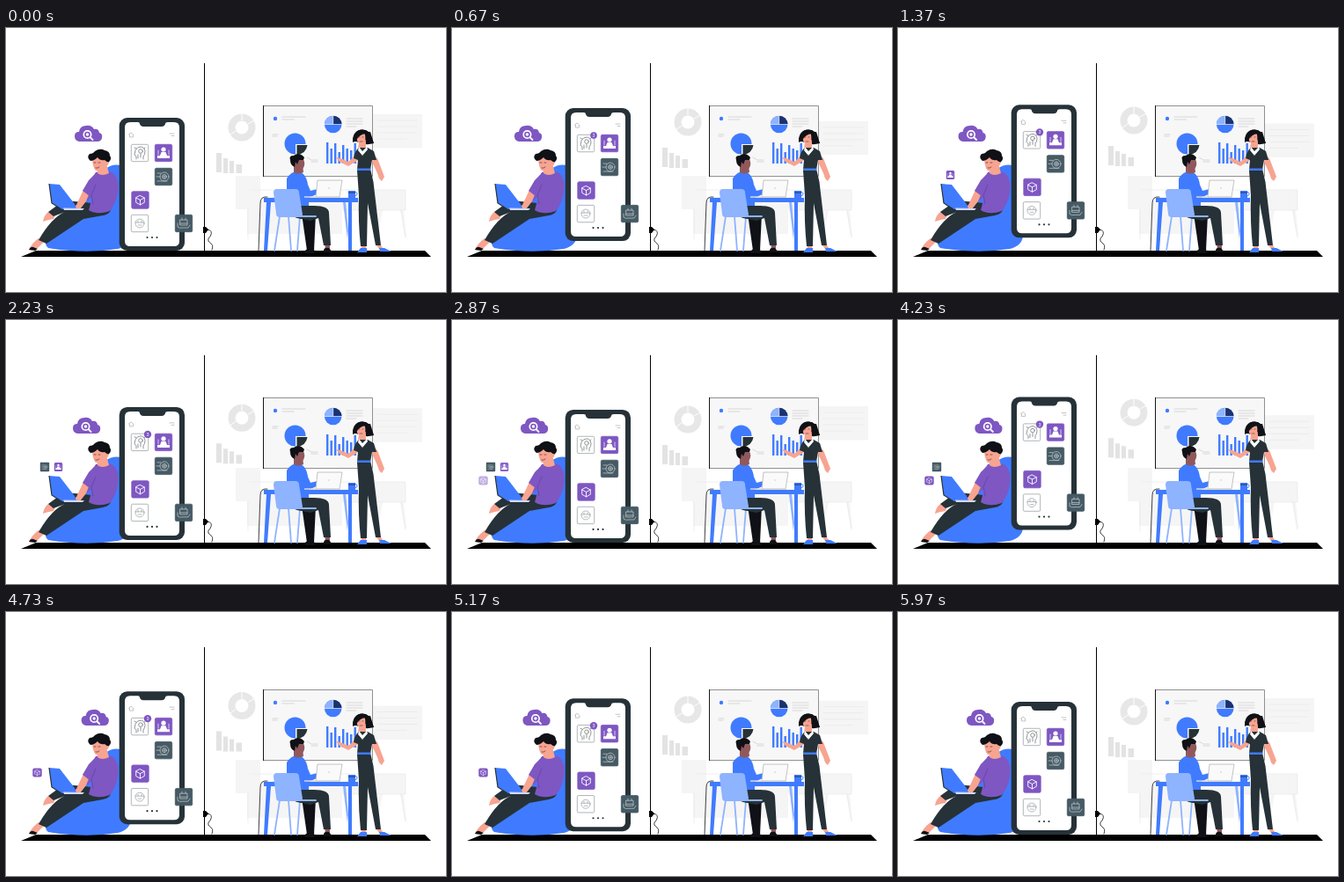
Write an HTML page that moves like this. It is 500 px wide and 300 px high and loops after 6030 ms.

```html
<!DOCTYPE html>
<html lang="en">
<head>
<meta charset="utf-8">
<title>Working together</title>
<style>
html, body { margin: 0; width: 100%; height: 100%; overflow: hidden; background: #fff; }
svg { display: block; width: 500px; height: 300px; }
.line { fill: none; stroke-linecap: round; stroke-linejoin: round; }
.dark { fill: #263238; } .blue { fill: #407bff; } .pale { fill: #8eb3ff; }
.purple { fill: #7e57c2; } .skin { fill: #f7a491; } .brown { fill: #91585c; }
.hair { fill: #101116; } .gray { fill: #e3e3e3; } .white { fill: #fff; }
</style>
</head>
<body>
<svg viewBox="0 0 500 300">
  <defs>
    <g id="cube" class="line" stroke="#fff" stroke-width=".9">
      <path d="M0-5 4.8-2.5V2.8L0 5.4-4.8 2.8V-2.5ZM-4.8-2.5 0 0 4.8-2.5M0 0V5.4"/>
    </g>
    <g id="person">
      <circle class="white" cy="-4" r="2.6"/>
      <path class="white" d="M-2.500-1H2.500L4 3H7V6H-7V3H-4Z"/>
      <path class="line" stroke="#fff" stroke-width=".7" d="M-6 2V-3M6 2V-3"/>
    </g>
    <g id="gear" class="line" stroke="#b8c1c5" stroke-width=".8">
      <circle cx="1" r="5"/><circle cx="1" r="2.500"/>
      <path d="M-7-4H-3M-8 0H-4M-7 5H4M1-2V2M-1 0H3"/>
    </g>
    <g id="mind" class="line" stroke="#85898c" stroke-width=".9">
      <path d="M-4 7V4L-6 2-5-3Q-3-7 1-7T6-2Q6 2 4 4V7"/>
      <circle cx="1" cy="-2" r="2.300"/><path d="M1 1V5M-2 2V6M-6-6-4-5M6-6 5-5"/>
    </g>
    <g id="face" class="line" stroke="#a5aaad" stroke-width=".8">
      <circle r="5"/><path d="M-5-1H5M-2 2H2M-2-3V-1M2-3V-1"/>
    </g>
    <g id="hand" class="line" stroke="#b8c1c5" stroke-width=".8">
      <path d="M-4-4H4V2H-4ZM-2-4V-6M2-4V-6M-7 0V4Q-5 6-1 5H5L7 2M-4 0H4"/>
    </g>
  </defs>

  <!-- background room -->
  <g fill="#f5f5f5">
    <path d="M261 168H289V192H454V207H382V234H274V206H261Z"/>
    <path d="M400 184H454V207H400ZM424 207H428L423 234H420ZM448 207H452L455 237H453Z"/>
  </g>
  <path class="line" stroke="#e9e9e9" stroke-width=".7" d="M277 184H454V207H383M275 206V240M449 207L454 238"/>
  <g id="card">
    <path d="M417 98H473V136.500H417Z" fill="#f5f5f5"/>
    <path class="line" stroke="#e9e9e9" stroke-width=".7" d="M422 105H467M422 112H467M422 119H467M422 126H455"/>
  </g>
  <g id="charts">
    <circle cx="268" cy="113" r="11.500" fill="none" stroke="#e7e7e7" stroke-width="8"/>
    <path d="M268 97V105M282 105L275 109M254 122L261 117" stroke="#fff"/>
    <path class="gray" d="M239 142H245V164H239ZM247 148H252V165H247ZM254 151H259V165H254ZM261.500 155H268V165H261.500Z"/>
  </g>

  <!-- board -->
  <path d="M292 88H417V169H292Z" fill="#f7f7f7"/>
  <path class="line" stroke="#777" stroke-width=".8" d="M293 88.500H416.500V168.500H293"/>
  <path d="M292.500 88V169" stroke="#171717"/>
  <circle class="blue" cx="306" cy="103" r="2.200"/>
  <path class="line" stroke="#c9c9c9" stroke-width=".7" d="M314 101H340M314 104H327M303 121H309M303 123H308M387 103H405M387 106H405M387 109H405M387 112H398M342 147L347 150H354M347 152H354"/>
  <circle class="blue" cx="328.500" cy="131.500" r="12"/>
  <path d="M329 132H343V146H329Z" fill="#f7f7f7"/>
  <path class="dark" d="M330.500 133H342.500Q341 143 330.500 144Z"/>
  <circle class="blue" cx="371.700" cy="109.500" r="9.800"/>
  <path d="M371.700 109.500V99.700A9.800 9.800 0 0 1 381.500 109.500Z" fill="#1b3270"/>
  <path class="pale" d="M371.700 109.500H361.900A9.800 9.800 0 0 1 371.700 99.700Z"/>
  <path d="M371.700 99V109.500H361M371.700 109.500H382" fill="none" stroke="#f7f7f7" stroke-width=".7"/>
  <g id="bars" class="blue"></g>

  <!-- floor, divider and cables -->
  <path d="M34 253H476L483 260H17Z"/>
  <path d="M225.500 40V253" stroke="#000"/>
  <path d="M224 226H227L230 229L227 233H224Z"/>
  <path class="line" stroke="#111" stroke-width=".8" d="M229 229Q236 230 232 237Q227 241 233 245Q236 247 234 252M297 192Q289 191 289 199Q288 225 287 253"/>

  <!-- seated colleague and table -->
  <path class="line" stroke="#8eb3ff" stroke-width="1.800" d="M334 214L331 253"/>
  <path class="hair" d="M336 211H352L350 253H342Z"/>
  <path class="brown" d="M362 244H368V252H363Z"/>
  <path class="dark" d="M318 202H346Q367 201 367 210L369 247H361L355 216L346 219L336 217Q323 216 318 202Z"/>
  <path class="hair" d="M340 253Q342 250 350 251L351 256H340ZM361 252Q362 249 367 250L371 255H361Z"/>
  <path class="blue" d="M293 193H400V198H393V253H389V198H301L297 253H293L296 198H293Z"/>
  <path class="pale" d="M383 198H386L389 230L388 240Z"/>
  <path class="blue" d="M319 171Q324 163 331 163Q341 164 343 178L346 185L354 183L355 188L344 193V202H319Z"/>
  <path class="brown" d="M354 183L358 180L360 182L356 188ZM327 155H337L338 164Q332 167 327 164Z"/>
  <ellipse class="brown" cx="333.500" cy="154" rx="5.800" ry="7.500"/>
  <path class="hair" d="M323 150Q321 145 327 145Q333 140 339 147L338 150H333L331 155L329 152L328 158Q323 156 323 150Z"/>
  <path d="M354 173H382L379 192H352Z" fill="#fafafa" stroke="#aaa" stroke-width=".7"/>
  <path d="M339 192H380" stroke="#d6d6d6" stroke-width="1.500"/>
  <circle cx="367" cy="182" r="1" fill="#ddd"/>
  <path class="blue" d="M389 185H397V193H389Z"/>
  <circle cx="397" cy="188.500" r="2" fill="none" stroke="#407bff"/>
  <path d="M389 187H397" stroke="#1b3270"/>
  <path class="pale" d="M308 183H329Q333 183 333 187L337 212Q337 215 333 215H311Q307 215 307 211L304 187Q304 183 308 183Z"/>
  <path class="line" stroke="#8eb3ff" stroke-width="1.800" d="M311 214L305 253M321 214L324 253M333 214H352"/>

  <!-- presenter -->
  <path class="skin" d="M398 144L402 149L389 157L379 152L375 147L380 148L389 152ZM417 145L422 148L430 169L427 174L424 171L422 165L415 150Z"/>
  <path class="hair" d="M394 129Q394 116 405 115.500Q415 116 415 126L418 131Q408 134 398 129Z"/>
  <path class="skin" d="M402 127H409V137L406 140L400 136Z"/>
  <ellipse class="skin" cx="403.500" cy="124.500" rx="5.200" ry="7"/>
  <path class="hair" d="M394 130Q394 116 405 115.500Q412 116 413 121Q403 118 398 128ZM408 118H414L418 131L409 131Z"/>
  <path class="line" stroke="#55353a" stroke-width=".6" d="M400 124H402M405 124H406M402 129H405"/>
  <path class="dark" d="M401 136H411L418 140L421 150H416L414 161H399L400 150L395 148Q396 140 401 136Z"/>
  <path class="white" d="M401 135L405 140L410 135L411 138L405 145L400 139Z"/>
  <path class="dark" d="M399 162H414.500Q418 174 419 188L426 247H420L411 199L410 248H403Q400 220 401 190Z"/>
  <path class="blue" d="M399 159.500H414.500V162H399Z"/>
  <path class="skin" d="M404 248H409V251H404ZM421 247H426L429 251H424Z"/>
  <path class="blue" d="M403 250H410V255H399ZM424 250H430L438 254H425Z"/>

  <!-- beanbag and reader -->
  <path class="blue" d="M48 250Q43 246 46 238Q59 215 84 205L113 160Q123 153 132 157Q140 182 142 235Q142 247 127 251Q90 257 48 250Z"/>
  <path class="skin" d="M37 239L43 243L36 250Q30 253 26 252Q29 245 37 239ZM48 209L56 212L54 217Q47 218 42 220Q43 213 48 209Z"/>
  <path class="hair" d="M26 252Q28 248 31 249L36 251L33 253Z"/>
  <path class="dark" d="M66 196L89 198L119 202Q121 211 110 213L88 217L46 245L37 241Q52 215 67 209L54 214L48 209Z"/>
  <path class="purple" d="M102 164Q113 160 122 165Q128 171 127.500 181Q127 197 118 208Q104 213 94 207L98 192L91 197L87 191L96 173Z"/>
  <path class="skin" d="M88 184L95 187L91 197L84 206L73 207L80 201Z"/>
  <path class="purple" d="M100 167L104 177L95 191L87 185L94 173Z"/>
  <path d="M102 178L97 190L99 200" fill="none" stroke="#6542a5" stroke-width=".8"/>
  <path class="skin" d="M104 156L114 154L117 165Q109 169 104 165Z"/>
  <path class="skin" d="M98 147Q106 143 114 148L115 156Q109 164 102 162Q98 158 98 147Z"/>
  <path class="hair" d="M96 151Q91 147 95 143Q99 143 101 140Q107 136 112 139Q118 140 118 145Q121 149 116 153L112 150Q107 151 104 147Q100 151 96 151Z"/>
  <circle class="skin" cx="114.500" cy="154" r="2"/>
  <path class="line" stroke="#583238" stroke-width=".7" d="M100 153H102M105 153H107M102 159Q104 160 106 158"/>
  <path class="blue" d="M49 177L61 178L78 200L80 205L63 206L52 199Z"/>
  <path d="M49 177L52 199L63 206" fill="none" stroke="#263238" stroke-width="1.200"/>
  <path d="M65 204.500L89 205L87 207H66Z" fill="#d1dafa"/>

  <g id="small">
    <g transform="translate(59.500 167)"><rect class="purple" x="-4.700" y="-5" width="9.400" height="10" rx="1.500"/><use href="#person" transform="scale(.48)"/></g>
    <g transform="translate(44 167)"><rect x="-5.200" y="-5.300" width="10.400" height="10.600" rx="1" fill="#455a64"/><use href="#gear" transform="scale(.5)"/></g>
    <g transform="translate(35.500 182.500)"><rect class="purple" x="-5.200" y="-5" width="10.400" height="10" rx="2"/><use href="#cube" transform="scale(.58)"/></g>
  </g>

  <g id="phone">
    <rect class="dark" x="128.700" y="102" width="74.300" height="151" rx="9"/>
    <path class="white" d="M141 107H150Q152 107 152 109Q153 112 156 112H177Q180 112 181 109Q181 107 184 107H191Q197 107 197 113V242Q197 248 191 248H141Q135 248 135 242V113Q135 107 141 107Z"/>
    <path class="line" stroke="#b5b5b5" stroke-width=".8" d="M139.500 121L142 119L144.500 121V124H140.500V121M186 120H191M188 122.500H191"/>
    <g id="tiles"></g>
    <g class="dark"><circle cx="160.500" cy="238" r="1.100"/><circle cx="166" cy="238" r="1.100"/><circle cx="171.500" cy="238" r="1.100"/></g>
    <g id="badge"><circle class="purple" r="4.200"/><text y="2" text-anchor="middle" font-family="Roboto, sans-serif" font-size="5.500" fill="#fff">3</text></g>
  </g>

  <g id="cloud">
    <path class="purple" d="M83 129Q78 128 78 123Q78 118 83 118Q84 111 91 111Q97 110 100 115Q105 114 106 119Q110 120 109 125Q108 129 104 129Z"/>
    <circle cx="92.500" cy="121" r="4.200" fill="none" stroke="#fff" stroke-width="1.700"/>
    <circle class="white" cx="92.500" cy="121" r="1.700"/>
    <path class="line" stroke="#fff" stroke-width="1.800" d="M96 124.500L98.500 127"/>
  </g>
</svg>
<script>
const $ = id => document.getElementById(id);

$('bars').innerHTML = [130, 137, 131, 141, 133, 137, 139, 131]
  .map((y, i) => `<rect x="${364 + i * 4.5}" y="${y}" width="2.4" height="${154 - y}"/>`).join('');

const tiles = [
  [152, 142, '#fff', 'mind'], [179, 142, '#7e57c2', 'person'],
  [179, 169, '#455a64', 'gear'], [152.5, 195.5, '#7e57c2', 'cube'],
  [152, 222, '#fff', 'face'], [202, 222, '#455a64', 'hand']
];
$('tiles').innerHTML = tiles.map(([x, y, fill, glyph]) =>
  `<g transform="translate(${x} ${y})">
    <rect x="-9.7" y="-9.7" width="19.4" height="19.4" rx="1.5" fill="${fill}"
      stroke="${fill === '#fff' ? '#9da2a5' : fill}" stroke-width=".8"/>
    <use href="#${glyph}"/>
  </g>`).join('');

const clamp = v => Math.max(0, Math.min(1, v));
const move = (id, x, y) => $(id).setAttribute('transform', `translate(${x} ${y})`);

// The CSS "ease" curve, solved by bisection
const bezier = (s, a, b) => 3 * (1 - s) ** 2 * s * a + 3 * (1 - s) * s * s * b + s ** 3;
function ease(x) {
  let lo = 0, hi = 1;
  for (let i = 0; i < 20; i++) {
    const mid = (lo + hi) / 2;
    if (bezier(mid, .25, .25) < x) lo = mid; else hi = mid;
  }
  return bezier(lo, .1, 1);
}

// Out and back, each half eased
const swing = p => p < .5 ? ease(p * 2) : 1 - ease(p * 2 - 1);

const windows = [[750, 3100], [1750, 4700], [2750, 5650]];
const LOOP = 6030, HALF = 3000, FADE = 250;

function draw(now) {
  const t = Math.min(now % LOOP, 5970);
  const p = t % HALF / HALF;
  const lift = swing(p);
  move('phone', 0, -14.7 * lift);
  move('charts', 0, -8 * lift);
  move('card', 0, 10.5 * lift);
  move('cloud', (t < HALF ? -9.5 : 9.5) * lift, 0);

  const size = ease(clamp((p - .12) / .16)) * (1 - ease(clamp((p - .8) / .16)));
  $('badge').setAttribute('transform', `translate(161 133) scale(${size})`);

  windows.forEach(([start, end], i) => {
    $('small').children[i].style.opacity = clamp((t - start) / FADE) * clamp((end - t) / FADE);
  });
}

const begin = performance.now();
function tick() {
  draw(performance.now() - begin);
  requestAnimationFrame(tick);
}
tick();
</script>
</body>
</html>
```
